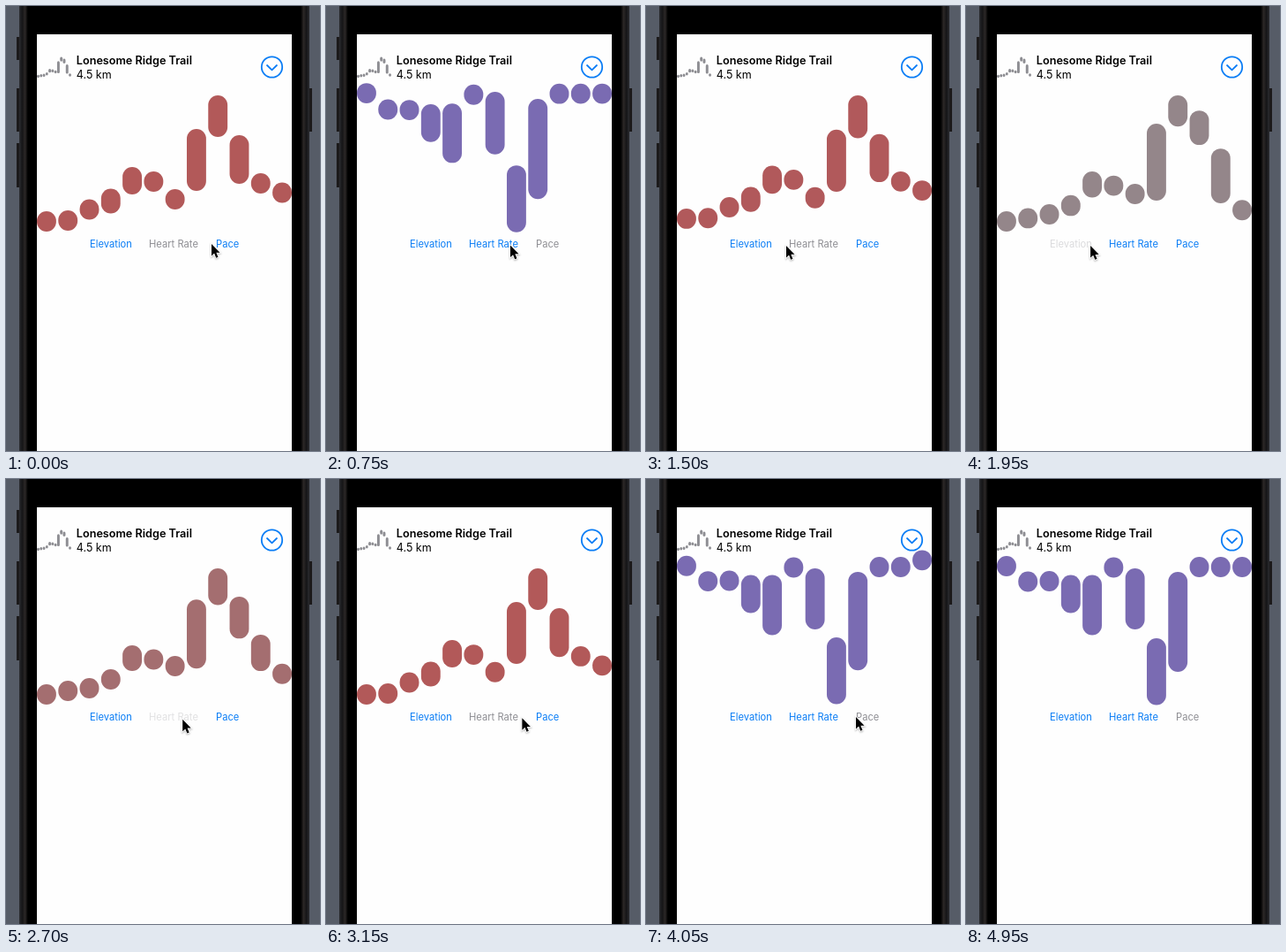
These frames come from a looping animation (356x503 px, 5250 ms). An HTML page with a canvas:

```html
<!DOCTYPE html>
<html lang="en">
<head>
<meta charset="utf-8">
<title>Hike graph</title>
<style>
html, body { margin: 0; width: 100%; height: 100%; overflow: hidden; background: #565c67; }
canvas { display: block; width: 356px; height: 503px; }
</style>
</head>
<body>
<canvas id="stage"></canvas>
<script>
const W = 356, H = 503, LOOP = 5250, STEP = 150, LAST = 4950;
const BLUE = '#0a7df5', GRAY = '#8e8e93';
const PRESS = 90, RIPPLE = 30, FADE = 240;
const LEAVE = 4200, GONE = 4800;
const MIN_H = 22.9;

const canvas = document.getElementById('stage');
const ctx = canvas.getContext('2d');
const dpr = window.devicePixelRatio || 1;
canvas.width = W * dpr;
canvas.height = H * dpr;

// A bar reaches down to its lower neighbour unless a longer span is given.
function series(color, tops, spans) {
  const bars = tops.map((y, i) => {
    const near = Math.max(tops[i - 1] || 0, tops[i + 1] || 0) + 2;
    return [y, spans[i] || Math.max(MIN_H, near - y)];
  });
  return { color, bars };
}

const data = {
  elevation: series([142, 142, 147],
    [232, 228, 225, 215, 188, 192.5, 200, 132, 101, 113, 156, 223], { 7: 90, 9: 36 }),
  heart: series([178, 89, 89],
    [232, 231, 218.5, 206.5, 182, 187, 207, 139, 101, 146, 189, 199.5], { 3: 28, 4: 31, 9: 55 }),
  pace: series([122, 107, 178],
    [87, 104.5, 104, 108.5, 108.5, 88.5, 101, 180, 105, 88, 88, 88],
    { 3: 43, 4: 68, 6: 69, 7: 75.5, 8: 113 })
};

const tabs = [
  { id: 'elevation', label: 'Elevation', x: 95 },
  { id: 'heart', label: 'Heart Rate', x: 162 },
  { id: 'pace', label: 'Pace', x: 238 }
];

// Late bars ripple in one after another; the rest move at once.
const leftHalf = i => i < 7;
const taps = [
  { at: -LOOP, to: 'heart', spot: [233, 269] },
  { at: 302, to: 'pace', spot: [238, 270], late: leftHalf },
  { at: 1150, to: 'heart', spot: [183, 271] },
  { at: 1863, to: 'elevation', spot: [134, 271] },
  { at: 2635, to: 'heart', spot: [197, 272], late: leftHalf },
  { at: 3468, to: 'pace', spot: [238, 269], late: i => [0, 1, 2, 4, 7, 8, 11].includes(i) }
];

const lerp = (a, b, p) => a + (b - a) * p;
const progress = (t, a, b) => Math.min(1, Math.max(0, (t - a) / (b - a)));

function spring(ms) {
  if (ms <= 0) return 0;
  const t = ms / 1000, zeta = 0.5, w = 2 * Math.PI / 0.275;
  const wd = w * Math.sqrt(1 - zeta * zeta);
  return 1 - Math.exp(-zeta * w * t) *
    (Math.cos(wd * t) + zeta * w / wd * Math.sin(wd * t));
}

function rect(color, x, y, w, h) {
  ctx.fillStyle = color;
  ctx.fillRect(x, y, w, h);
}

function capsule(i, y, h) {
  const gap = 289 / 120, w = (289 - gap * 11) / 12;
  ctx.beginPath();
  ctx.roundRect(i * (w + gap), y, w, h, Math.min(w, h) / 2);
  ctx.fill();
}

function text(str, x, y, font, color) {
  ctx.font = font + ' Inter, sans-serif';
  ctx.fillStyle = color;
  ctx.fillText(str, x, y);
}

function phone() {
  rect('#565c67', 0, 0, W, H);
  rect('#1c1a1b', 12, 35, 4, 26);
  rect('#1c1a1b', 12, 93, 4, 49);
  rect('#1c1a1b', 12, 155, 4, 50);
  rect('#1c1a1b', 343, 93, 4, 49);
  const edge = ctx.createLinearGradient(15, 0, 344, 0);
  ['#2c2d31', '#151517', '#2b2726', '#000'].forEach((c, i) => {
    edge.addColorStop(i * 0.01, c);
    edge.addColorStop(1 - i * 0.01, c);
  });
  rect(edge, 15, 0, 329, H);
  rect('#000', 25, 0, 309, H);
  rect('#fefefe', 35, 32, 289, H - 32);
}

function header() {
  ctx.save();
  ctx.translate(35, 57.6);
  ctx.scale(39 / 289, 0.153);
  ctx.fillStyle = GRAY;
  data.elevation.bars.forEach(([y, h], i) => capsule(i, y - 101, h));
  ctx.restore();

  text('Lonesome Ridge Trail', 79.8, 66, '600 12.65px', '#000');
  text('4.5 km', 79.8, 81.5, '400 12.5px', '#000');

  ctx.strokeStyle = BLUE;
  ctx.lineWidth = 1.8;
  ctx.lineCap = ctx.lineJoin = 'round';
  ctx.beginPath();
  ctx.arc(301.5, 69, 11.7, 0, 2 * Math.PI);
  ctx.moveTo(296, 67);
  ctx.lineTo(301.5, 72.3);
  ctx.lineTo(307, 67);
  ctx.stroke();
}

function graph(age, from, to, late) {
  const hue = spring(age);
  ctx.fillStyle = `rgb(${from.color.map((c, k) => Math.round(lerp(c, to.color[k], hue)))})`;
  ctx.save();
  ctx.translate(35, 0);
  to.bars.forEach(([y, h], i) => {
    const p = spring(late && late(i) ? age - RIPPLE * (i + 1) : age);
    const [y0, h0] = from.bars[i];
    capsule(i, lerp(y0, y, p), lerp(h0, h, p));
  });
  ctx.restore();
}

function labels(t, tap, next) {
  for (const { id, label, x } of tabs) {
    const on = id === tap.to;
    ctx.globalAlpha = 1;
    if (on) ctx.globalAlpha = lerp(0.2, 1, progress(t, tap.at, tap.at + FADE) ** 2);
    if (next && id === next.to && t >= next.at - PRESS) ctx.globalAlpha = 0.2;
    text(label, x, 272.6, '400 11.2px', on ? GRAY : BLUE);
  }
  ctx.globalAlpha = 1;
}

function pointer(t, tap, next) {
  if (t > GONE) return;
  const goal = next ? next.spot : [208, 463];
  const p = next ? progress(t, Math.max(0, tap.at), next.at) : progress(t, LEAVE, GONE) ** 2;
  ctx.save();
  ctx.translate(lerp(tap.spot[0], goal[0], p), lerp(tap.spot[1], goal[1], p));
  ctx.scale(0.87, 0.87);
  ctx.beginPath();
  for (const [x, y] of [[0, 0], [0, 15.5], [3.6, 12.2], [6, 18], [8.6, 16.9], [6.2, 11.3], [11, 11.2]])
    ctx.lineTo(x, y);
  ctx.closePath();
  ctx.shadowColor = 'rgba(0,0,0,.3)';
  ctx.shadowBlur = 2 * dpr;
  ctx.shadowOffsetY = dpr;
  ctx.strokeStyle = '#fff';
  ctx.lineWidth = 2;
  ctx.lineJoin = 'miter';
  ctx.stroke();
  ctx.shadowColor = 'transparent';
  ctx.fillStyle = '#000';
  ctx.fill();
  ctx.restore();
}

function draw(t) {
  const k = taps.findLastIndex(tap => tap.at <= t);
  const tap = taps[k], prev = taps[k - 1] || tap, next = taps[k + 1];
  ctx.setTransform(dpr, 0, 0, dpr, 0, 0);
  phone();
  header();
  graph(t - tap.at, data[prev.to], data[tap.to], tap.late);
  labels(t, tap, next);
  pointer(t, tap, next);
}

let start;
function tick(now) {
  if (start === undefined) start = now;
  const t = Math.max(0, now - start) % LOOP;
  draw(Math.min(LAST, Math.floor(t / STEP) * STEP));
  requestAnimationFrame(tick);
}
draw(0);
requestAnimationFrame(tick);
</script>
</body>
</html>
```
